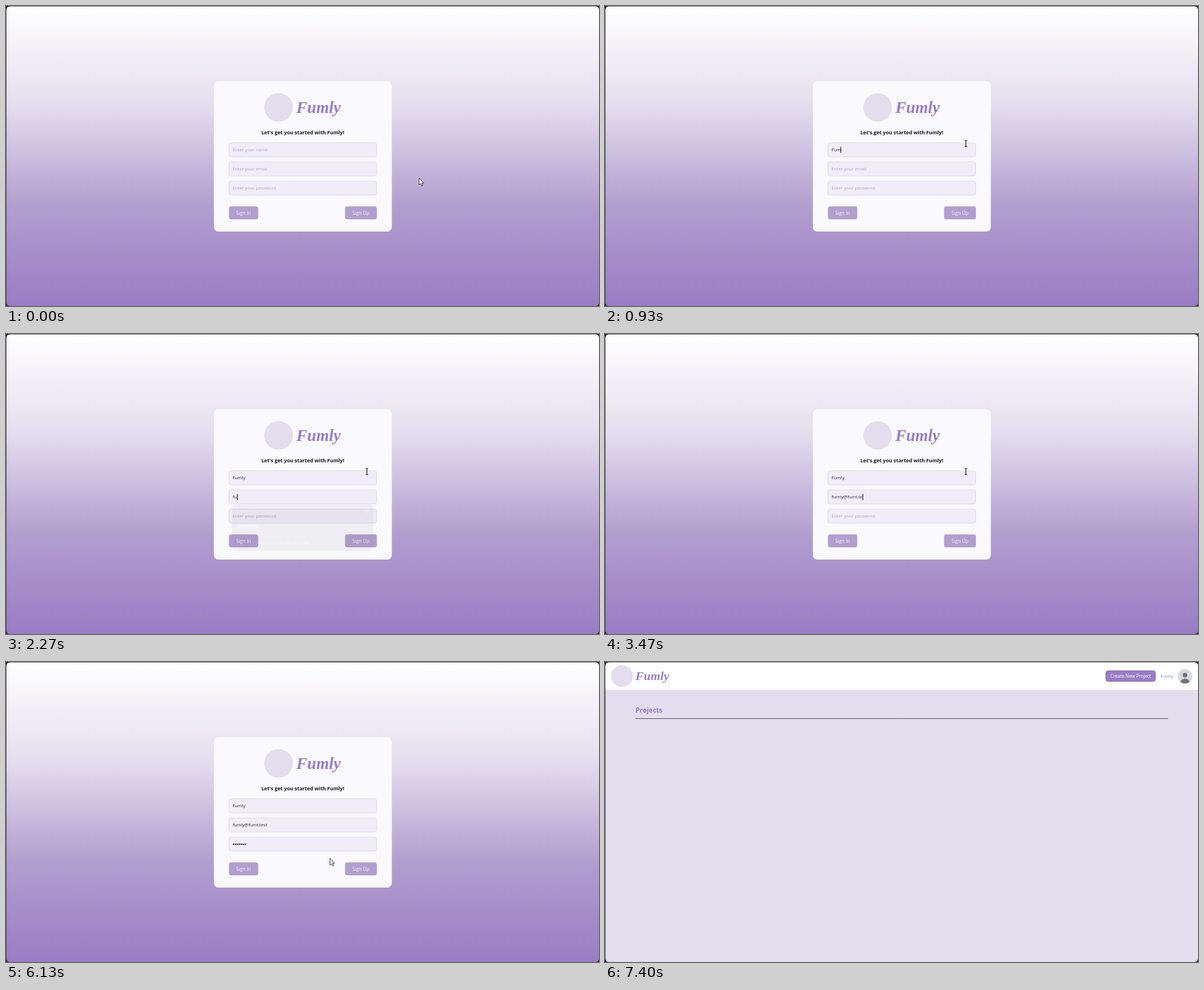
An HTML page with a canvas that plays this animation: 1052 px wide and 533 px high, repeating every 8070 ms.

```html
<!DOCTYPE html>
<html lang="en">
<head>
<meta charset="utf-8">
<title>Sign up</title>
<style>
  html, body { margin: 0; width: 100%; height: 100%; overflow: hidden; background: #2b2a2e; }
  canvas { display: block; }
</style>
</head>
<body>
<canvas id="stage" width="1052" height="533"></canvas>
<script>
const W = 1052, H = 533, LOOP = 8070, TICK = 200 / 3;
const stage = document.getElementById('stage');
const layer = document.createElement('canvas');
layer.width = W;
layer.height = H;
let ctx = stage.getContext('2d');
const layerCtx = layer.getContext('2d');

const SANS = '"Open Sans", "Noto Sans", sans-serif';
const BRAND = 'Fumly';
const PURPLE = '#997cc4', LILAC = '#b29ecf', LAVENDER = '#e4ddee', PAPER = '#f9f9fe', INK = '#1c1626';

const fields = [
  { y: 243, hint: 'Enter your name', value: BRAND, from: 400, to: 1330,
    keys: [600, 800, 930, 1070, 1130] },
  { y: 277, hint: 'Enter your email', value: 'fumly@fuml.test', from: 1330, to: 3730,
    keys: [2130, 2270, 2330, 2470, 2470, 2670, 2870, 2930, 3070, 3130, 3200, 3330, 3400, 3530, 3600] },
  { y: 311, hint: 'Enter your password', secret: true, from: 3730, to: 5270,
    keys: [3930, 4070, 4130, 4270, 4600, 4730, 4870] }
];
const buttons = [
  { x: 395.5, w: 52, label: 'Sign In' },
  { x: 601.5, w: 56.5, label: 'Sign Up' }
];
const popups = [
  { open: 530, close: 600, y: 267, h: 141,
    rows: [['Dimplet', 'dimplet@fumlyap.test'], ['Orvell K', 'contact@orvellk.test']] },
  { open: 1730, close: 2130, y: 301, h: 86, rows: [['vbbv@vbv']] }
];
const PREVIEW = 'vbbv@vbv';
const PAGE_SWAP = 6470;

// time, x, y, eased
const path = [
  [0, 733, 306], [400, 640, 244, true], [4750, 640, 244], [5070, 642, 300], [5330, 628, 364],
  [5650, 628, 364], [5670, 629, 366], [5880, 629, 366], [6137, 575, 349], [6740, 228, 218],
  [7340, 13, 525], [7400, 5, 550], [LOOP, 5, 550]
];

function text(str, x, y, size, color, { weight = 400, align = 'left', font = SANS, style = '' } = {}) {
  ctx.font = `${style} ${weight} ${size}px ${font}`;
  ctx.fillStyle = color;
  ctx.textAlign = align;
  ctx.fillText(str, x, y);
}

function box(x, y, w, h, r, fill, stroke) {
  ctx.beginPath();
  ctx.roundRect(x, y, w, h, r);
  if (fill) { ctx.fillStyle = fill; ctx.fill(); }
  if (stroke) { ctx.strokeStyle = stroke; ctx.lineWidth = 1; ctx.stroke(); }
}

function disc(x, y, r, fill) {
  ctx.beginPath();
  ctx.arc(x, y, r, 0, Math.PI * 2);
  ctx.fillStyle = fill;
  ctx.fill();
}

function line(color, width, ...pts) {
  ctx.beginPath();
  pts.forEach(([x, y], i) => i ? ctx.lineTo(x, y) : ctx.moveTo(x, y));
  ctx.strokeStyle = color;
  ctx.lineWidth = width;
  ctx.stroke();
}

function windowFrame(fill) {
  ctx.fillStyle = '#2b2a2e';
  ctx.fillRect(0, 0, W, H);
  box(0.8, 0.8, W - 0.8, H - 0.8, 6, fill);
}

function wordmark(x, y, size) {
  text(BRAND, x, y, size, PURPLE, { weight: 700, style: 'italic', font: '"Liberation Serif", serif' });
}

function eye(x, y) {
  ctx.strokeStyle = INK;
  ctx.lineWidth = 1;
  ctx.beginPath();
  ctx.moveTo(x - 5, y + 1);
  ctx.bezierCurveTo(x - 4, y - 5, x + 4, y - 5, x + 5, y + 1);
  ctx.stroke();
  ctx.beginPath();
  ctx.arc(x, y + 1, 2.2, 0, Math.PI * 2);
  ctx.stroke();
}

function drawField(f, t) {
  box(395.5, f.y, 262, 25, 4, '#f0edf8', '#dcd6e8');
  const count = f.keys.filter(k => k <= t).length;
  const focused = t >= f.from && t < f.to;
  const base = f.y + 15.4;
  const preview = f === fields[1] && t >= popups[1].open && t < popups[1].close;
  let end = 402;

  if (preview) {
    box(401.5, f.y + 6.5, 39, 12, 0, '#e4eaf9');
    text(PREVIEW, 402, base, 8, INK);
    box(442.5, f.y + 8.5, 12, 8, 1, null, '#a7a3b2');
    text('Tab', 448.5, f.y + 14.7, 5.5, '#85818f', { align: 'center' });
  } else if (!count) {
    text(f.hint, 402, base, 8, LILAC);
  } else if (f.secret) {
    for (let i = 0; i < count; i++) disc(403.7 + i * 3.45, f.y + 12.7, 1.3, INK);
    end += count * 3.45;
  } else {
    const typed = f.value.slice(0, count);
    text(typed, 402, base, 8, '#2b2435');
    end += ctx.measureText(typed).width;
  }
  if (focused && !preview) {
    ctx.fillStyle = '#000';
    ctx.fillRect(Math.round(end), f.y + 7, 1, 11);
  }
  if (f.secret && count && focused) eye(643.7, f.y + 12.5);
}

function drawLogin(t) {
  const sky = ctx.createLinearGradient(0, 0, 0, H);
  ['#ffffff', LAVENDER, LILAC, PURPLE].forEach((c, i) => sky.addColorStop(i / 3, c));
  windowFrame(sky);
  box(368.8, 133.6, 315.7, 267.2, 8, PAPER);
  disc(483.6, 180.2, 25.4, LAVENDER);
  wordmark(515, 190, 29);
  text(`Let's get you started with ${BRAND}!`, 526.5, 228, 9, INK, { weight: 700, align: 'center' });
  fields.forEach(f => drawField(f, t));
  for (const b of buttons) {
    box(b.x, 356, b.w, 23, 4, LILAC);
    text(b.label, b.x + b.w / 2, 370.6, 8.5, PAPER, { align: 'center' });
  }
}

function walletIcon(x, y) {
  ctx.strokeStyle = '#f2f2f2';
  ctx.lineWidth = 0.9;
  ctx.beginPath();
  ctx.arc(x - 1.2, y - 2.7, 2.3, 0, Math.PI * 2);
  ctx.stroke();
  ctx.beginPath();
  ctx.moveTo(x, y + 4.6);
  ctx.bezierCurveTo(x - 6.5, y + 5, x - 5, y + 1, x - 3.5, y + 1);
  ctx.lineTo(x, y + 1);
  ctx.stroke();
  box(x + 0.8, y + 1, 4.2, 3.8, 0.8, null, '#f2f2f2');
}

function drawPopup(p, t) {
  const age = t - p.close;
  const alpha = Math.min(1, 1 - age / 149);
  if (t < p.open || alpha <= 0) return;

  const main = ctx, { y, h } = p, foot = y + h - 15;
  const scale = 1 - 0.05 * Math.max(0, age) / 140;
  ctx = layerCtx;
  ctx.clearRect(0, 0, W, H);
  ctx.save();
  ctx.translate(526, y + h / 2);
  ctx.scale(scale, scale);
  ctx.translate(-526, -y - h / 2);
  ctx.shadowColor = 'rgba(0,0,0,.35)';
  ctx.shadowBlur = 8;
  ctx.shadowOffsetY = 3;
  box(394.5, y + 0.5, 263, h - 1, 5, '#4a4a4a');
  ctx.shadowColor = 'transparent';
  box(394.5, y + 0.5, 263, h - 1, 5, null, '#626262');
  text('Saved personal info', 403.5, y + 15.8, 7.35, '#bdbdbd');
  line('#e4e4e4', 1, [643, y + 10], [649, y + 16]);
  line('#e4e4e4', 1, [649, y + 10], [643, y + 16]);
  p.rows.forEach(([title, detail], i) => {
    const rowY = y + 41.7 + i * 41;
    text(title, 404, rowY, 7.7, '#fff', { weight: 700 });
    if (detail) text(detail, 404, rowY + 14.3, 8.2, '#fff');
  });
  line('#5e5e5e', 1, [395, foot - 14.5], [657, foot - 14.5]);
  walletIcon(408.5, foot);
  text('Manage personal info in Tolvet', 422.5, foot + 3, 8.2, '#fff');
  ctx.restore();

  ctx = main;
  ctx.globalAlpha = alpha;
  ctx.drawImage(layer, 0, 0);
  ctx.globalAlpha = 1;
}

function drawProjects() {
  windowFrame(LAVENDER);
  box(0.8, 0.8, W - 0.8, 48.7, [6, 6, 0, 0], '#fff');
  disc(30.2, 25, 19.3, LAVENDER);
  wordmark(54, 32, 22);
  box(888.5, 15.5, 88, 19, 4, PURPLE, '#8a6cb8');
  text('Create New Project', 932.5, 28.4, 8.1, '#fff', { align: 'center' });
  text(BRAND, 985.3, 28.4, 8, PURPLE);
  disc(1029, 25.5, 13, '#d6d9df');
  ctx.save();
  ctx.beginPath();
  ctx.arc(1029, 25.5, 12.6, 0, Math.PI * 2);
  ctx.clip();
  disc(1029, 23.3, 4.1, '#6c717c');
  disc(1029, 38.2, 8.7, '#6c717c');
  ctx.restore();
  text('Projects', 54, 90.3, 11.9, PURPLE, { weight: 700 });
  line('#474151', 1, [54, 100.5], [999, 100.5]);
}

function cursorAt(t) {
  const i = path.findIndex(p => p[0] > t);
  const [t0, x0, y0] = path[i - 1], [t1, x1, y1, eased] = path[i];
  let k = (t - t0) / (t1 - t0);
  if (eased) k = k * k * (3 - 2 * k);
  return [x0 + (x1 - x0) * k, y0 + (y1 - y0) * k];
}

const ARROW = new Path2D('M0 0V12L2.7 9.5L4.5 13.5L6.4 12.7L4.7 8.8H8.2Z');
const HAND = new Path2D('M-.9 .8Q0-.5 .9 .8V5L7 6Q9 6.4 8.6 9L7.6 14H.6L-3 9.2Q-2.7 7.6-.9 9Z');

function drawCursor(x, y, login) {
  const inside = (l, top, w, h) => x >= l && x <= l + w && y >= top && y <= top + h;
  ctx.save();
  ctx.translate(x, y);
  if (login && fields.some(f => inside(395, f.y, 263, 25))) {
    line('#111', 1.2, [0.3, -5], [0.3, 5.5]);
    line('#111', 1, [-2, -5], [2.6, -5]);
    line('#111', 1, [-2, 5.5], [2.6, 5.5]);
  } else {
    const shape = login && buttons.some(b => inside(b.x, 356, b.w, 23)) ? HAND : ARROW;
    ctx.fillStyle = '#fff';
    ctx.strokeStyle = '#17141c';
    ctx.lineWidth = 0.9;
    ctx.fill(shape);
    ctx.stroke(shape);
  }
  ctx.restore();
}

function render(now) {
  // the picture advances 15 times a second
  const t = Math.min(LOOP - 1, Math.floor((now % LOOP + 4) / TICK) * TICK + 4);
  const login = t < PAGE_SWAP;
  if (login) {
    drawLogin(t);
    popups.forEach(p => drawPopup(p, t));
  } else {
    drawProjects();
  }
  drawCursor(...cursorAt(t), login);
}

let start;
function frame(now) {
  start ??= now;
  render(now - start);
  requestAnimationFrame(frame);
}
requestAnimationFrame(frame);
</script>
</body>
</html>
```
